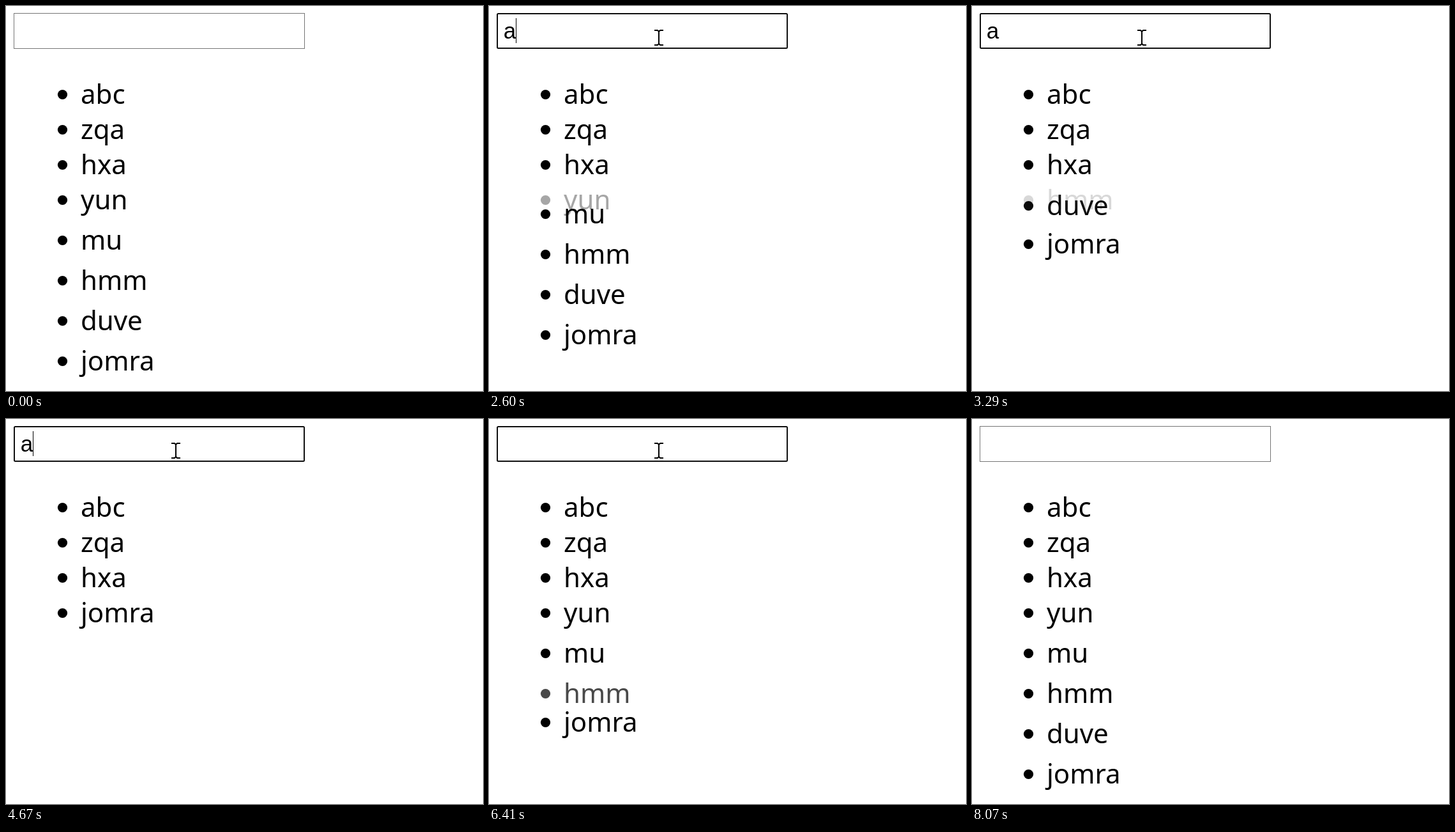
These frames come from a looping animation (747x602 px, 8.11 s). An HTML page:

```html
<!DOCTYPE html>
<html lang="en">
<head>
<meta charset="utf-8">
<title>List filter</title>
<style>
html, body { margin: 0; width: 100%; height: 100%; overflow: hidden; background: #fff; }
svg { display: block; }
#list { font: 42px "Noto Sans", "Open Sans", sans-serif; }
#typed { font: 35px "Liberation Sans", Arial, sans-serif; }
</style>
</head>
<body>
<svg width="747" height="602" viewBox="0 0 747 602">
  <rect id="field" fill="#fff"/>
  <text id="typed" x="22.7" y="51">a</text>
  <rect id="caret" width="1" height="39"/>
  <g id="list"></g>
  <path id="beam" fill="none" stroke="#000" stroke-width="2"
    d="M-7-11h5l2 2 2-2h5M0-9V10M-7 12h5l2-2 2 2h5"/>
  <path id="arrow" fill="#fff" stroke="#000" d="M.5.5v16l3.7-3.6 2.5 5.6 2.3-1-2.5-5.4h5z"/>
</svg>
<script>
const LOOP = 8110, ROW = 55, TALL = 63, FADE = 500;
const TYPE = 1540, ERASE = 4710, FOCUS = 1130, BLUR = 8070;
const words = ["abc", "zqa", "hxa", "yun", "mu", "hmm", "duve", "jomra"];
// Moments at which the caret turns on or off, starting with on
const blinks = [FOCUS, 2070, 2600, 3130, 3650, 4140, 4670, 5160, 5690, 6210, 6730, 7210, 7740, BLUR];

const $ = id => document.getElementById(id);
const clamp = p => Math.min(1, Math.max(0, p));
const easeOut = p => 1 - (1 - clamp(p)) ** 2;
const smooth = p => p * p * (3 - 2 * p);
const mix = (a, b, p) => a + (b - a) * p;

function set(el, attrs) {
  for (const k in attrs) el.setAttribute(k, attrs[k]);
}
function show(el, on) {
  el.style.display = on ? "" : "none";
}

$("list").innerHTML = words.map(w =>
  `<g><circle cx="88.5" cy="138.5" r="7.6"/><text x="117" y="153">${w}</text></g>`).join("");
const rows = [...$("list").children];

// How much of a row is open, 0 to 1; rows without an "a" fold one after another
function openness(i, t) {
  if (words[i].includes("a")) return 1;
  const k = i - 3;
  return t < ERASE
    ? 1 - easeOut((t - 2394 - 295 * k) / FADE)
    : easeOut((t - 5581 - 300 * k) / FADE);
}

function drawList(t) {
  let y = 0;
  rows.forEach((row, i) => {
    const open = openness(i, t);
    set(row, { transform: `translate(0 ${Math.round(y)})`, opacity: open });
    y += i < 3 ? ROW : TALL * open;
  });
}

function pointer(t) {
  if (t < 120 || t >= 7490) return null;
  if (t < 600) {
    const p = smooth((t - 100) / 500);
    return [mix(680, 267, p), mix(574, 56, p)];
  }
  if (t < 1050) return [267, 56];
  const p = clamp((t - 7150) / 320) ** 1.5;
  return [mix(266, 643, p), mix(49, 590, p)];
}

function drawPointer(at) {
  const inside = at && at[0] > 12 && at[0] < 468 && at[1] > 11 && at[1] < 67;
  show($("beam"), inside);
  show($("arrow"), at && !inside);
  if (at) set($(inside ? "beam" : "arrow"), { transform: `translate(${at.map(Math.round)})` });
  return inside;
}

function drawField(t, hover) {
  const focused = t >= FOCUS && t < BLUR, typed = t >= TYPE && t < ERASE;
  set($("field"), focused
    ? { x: 13, y: 12, width: 454, height: 54, rx: 1.5, stroke: "#101010", "stroke-width": 2 }
    : { x: 12.5, y: 11.5, width: 455, height: 55, rx: 0, stroke: hover ? "#4f4f4f" : "#767676", "stroke-width": 1 });
  show($("typed"), typed);
  show($("caret"), blinks.filter(b => b <= t).length % 2);
  set($("caret"), typed ? { x: 42, y: 19 } : { x: 23, y: 20 });
}

function draw(now) {
  const t = now % LOOP;
  drawList(t);
  drawField(t, drawPointer(pointer(t)));
  requestAnimationFrame(draw);
}
draw(0);
</script>
</body>
</html>
```
